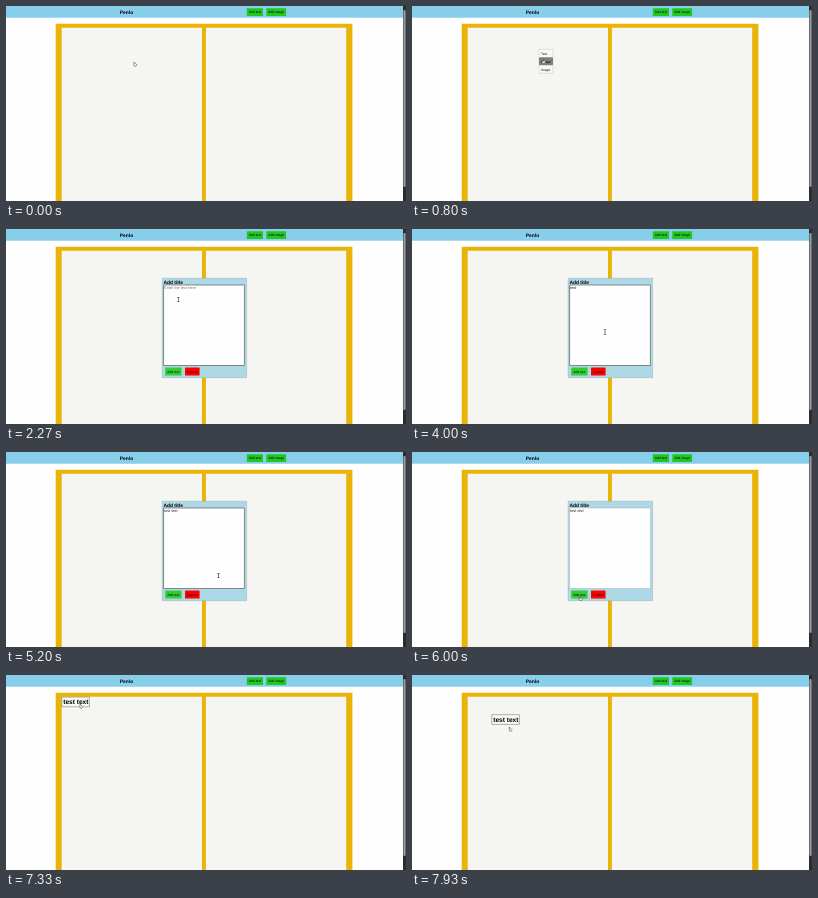
An HTML page with a canvas that plays this animation: 400 by 195 pixels, repeating every 8 s.

```html
<!DOCTYPE html>
<html lang="en">
<head>
<meta charset="utf-8">
<title>Note board</title>
<style>
  html, body { margin: 0; width: 100%; height: 100%; overflow: hidden; background: #fefefe; }
  canvas { display: block; width: 400px; height: 195px; }
</style>
</head>
<body>
<canvas id="stage"></canvas>
<script>
const LOOP = 8000, STEP = 1000 / 15;
const MENU_OPEN = 460, DIALOG_OPEN = 1460, MENU_CLOSE = 1530;
const FOCUS = 2130, BLUR = 5860, DIALOG_CLOSE = 6060, DRAG = 7600, DROP = 7933;
const SANS = '"Liberation Sans", Arial, sans-serif';
const canvas = document.getElementById('stage');
const ctx = canvas.getContext('2d');
const dpr = window.devicePixelRatio || 1;
canvas.width = 400 * dpr;
canvas.height = 195 * dpr;

// Pointer moves: start, end, goal, sideways bow
const home = { x: 128, y: 56 };
const moves = [
  [200, 467, 127, 43],
  [600, 800, 131, 53],
  [800, 1000, 130.5, 48.5],
  [1733, 2133, 168.5, 64.5],
  [2133, 2667, 193, 103],
  [4733, 5667, 168, 144, 32],
  [6133, 6467, 44, 12],
  [6467, 6760, 95, 7],
  [6867, 7333, 74, 29],
  [DRAG, DROP, 97.3, 52]
];

// Typing bursts: start, characters, time per character
const bursts = [[3060, 'test', 100], [3995, ' te', STEP], [4395, 'xt', STEP]];

const edit = { x: 157.6, y: 56, w: 80.8, h: 80.5 };
const ok = { x: 159.2, y: 138.5, w: 16.4, h: 8 };
const cancel = { x: 179, y: 138.5, w: 14.6, h: 8 };

function progress(t, start, end) {
  const p = Math.min(1, Math.max(0, (t - start) / (end - start)));
  return p * p * (3 - 2 * p);
}

function pointerAt(t) {
  return moves.reduce((at, [start, end, x, y, bow = 0]) => {
    const p = progress(t, start, end);
    return { x: at.x + (x - at.x) * p + bow * 4 * p * (1 - p), y: at.y + (y - at.y) * p };
  }, home);
}

function typedAt(t) {
  return bursts.map(([start, chars, gap]) =>
    chars.slice(0, Math.max(0, Math.floor((t - start) / gap) + 1))).join('');
}

const inside = (p, r) => p.x > r.x && p.x < r.x + r.w && p.y > r.y && p.y < r.y + r.h;

function box(x, y, w, h, fill, stroke, lw = 0.4, r = 0) {
  ctx.beginPath();
  ctx.roundRect(x, y, w, h, r);
  ctx.fillStyle = fill;
  ctx.fill();
  if (!stroke) return;
  ctx.strokeStyle = stroke;
  ctx.lineWidth = lw;
  ctx.stroke();
}

function label(str, x, y, size, { color = '#000', bold = false, align = 'left' } = {}) {
  ctx.font = `${bold ? 'bold ' : ''}${size}px ${SANS}`;
  ctx.textAlign = align;
  ctx.fillStyle = color;
  ctx.fillText(str, x, y);
}

function button(str, { x, y, w, h }, fill) {
  box(x, y, w, h, fill, null, 0, 0.6);
  label(str, x + w / 2, y + h / 2 + 1.2, 3.33, { align: 'center' });
}

function page() {
  box(0, 0, 400, 195, '#fefefe');
  box(0, 0, 397, 11.7, '#87ceeb');
  label('Penlo', 113.8, 7.9, 4.9, { bold: true });
  button('Add text', { x: 240.8, y: 2.2, w: 16.2, h: 7.8 }, '#22c722');
  button('Add image', { x: 260.3, y: 2.2, w: 19.8, h: 7.8 }, '#22c722');
  box(49.7, 17.7, 296.7, 178, '#eab308');
  for (const x of [55.7, 199.9]) box(x, 21.7, 140.3, 174, '#f5f5f1');
  box(397, 0, 3, 195, '#2c2c2c');
  box(397.4, 4, 2.2, 177, '#9c9c9c', null, 0, 1);
}

function menu(cursor) {
  box(127, 43.3, 14, 24, '#f8f8f6', '#b5b5b5', 0.4, 1);
  const hover = Math.floor((cursor.y - 43) / 8);
  ['Text', 'Shape', 'Image'].forEach((name, i) => {
    const y = 43.3 + i * 8;
    if (i === hover) box(127, y, 14, 8, '#808080', null, 0, 1);
    label(name, 129, y + 5.2, 3.33);
  });
}

function dialog(t) {
  const focused = t >= FOCUS && t < BLUR;
  const typed = typedAt(t);
  box(156.2, 49.2, 84.4, 99.5, '#add8e6', '#7b8e96', 0.3);
  label('Add title', 157.5, 55, 4.9, { bold: true });
  box(edit.x, edit.y, edit.w, edit.h, '#fefefe', focused ? '#444' : '#888', focused ? 0.6 : 0.3, 0.4);
  label(typed || 'Enter the text here', 158.1, 59.9, 3.87, { color: typed ? '#222' : '#777' });
  button('Add text', ok, '#32cd32');
  button('Cancel', cancel, '#ff0000');
}

function note(x, y) {
  box(x, y, 27.6, 9.7, '#f8f8f5', '#666', 0.5);
  label('test text', x + 1.4, y + 7.2, 6.6, { bold: true });
}

const shapes = {
  arrow() {
    ctx.beginPath();
    ctx.moveTo(0, 0);
    ctx.lineTo(0, 3.8);
    ctx.lineTo(1.6, 4.4);
    ctx.lineTo(2.8, 2.8);
    ctx.closePath();
    ctx.fillStyle = '#fff';
    ctx.fill();
    ctx.strokeStyle = '#111';
    ctx.lineWidth = 0.45;
    ctx.stroke();
  },
  hand() {
    box(-1, 1.6, 3.2, 2.8, '#fff', '#111', 0.45, 1);
    box(-0.4, 0, 0.9, 2.6, '#fff', '#111', 0.4, 0.4);
  },
  beam() {
    box(-0.3, -2.4, 0.6, 4.8, '#222');
    for (const y of [-2.5, 2]) box(-1.3, y, 2.6, 0.45, '#222');
  }
};

function pointer(at, menuOpen, dialogOpen) {
  let kind = 'arrow';
  if (dialogOpen && inside(at, edit)) kind = 'beam';
  else if (menuOpen && at.y > 44 || dialogOpen && (inside(at, ok) || inside(at, cancel))) kind = 'hand';
  ctx.save();
  ctx.translate(at.x, at.y);
  shapes[kind]();
  ctx.restore();
}

function draw(now) {
  // The screen refreshes at a fixed rate
  const t = Math.floor((now % LOOP + 5) / STEP) * STEP % LOOP;
  const cursor = pointerAt(t);
  const menuOpen = t >= MENU_OPEN && t < MENU_CLOSE;
  const dialogOpen = t >= DIALOG_OPEN && t < DIALOG_CLOSE;
  ctx.setTransform(dpr, 0, 0, dpr, 0, 0);
  ctx.textRendering = 'geometricPrecision';
  page();
  if (t >= DIALOG_CLOSE) {
    const p = progress(t, DRAG, DROP);
    note(55.8 + 24 * p, 22.1 + 17.6 * p);
  }
  if (dialogOpen) dialog(t);
  if (menuOpen) menu(cursor);
  pointer(cursor, menuOpen, dialogOpen);
}

const start = performance.now();
function tick() {
  draw(performance.now() - start);
  requestAnimationFrame(tick);
}
tick();
</script>
</body>
</html>
```
